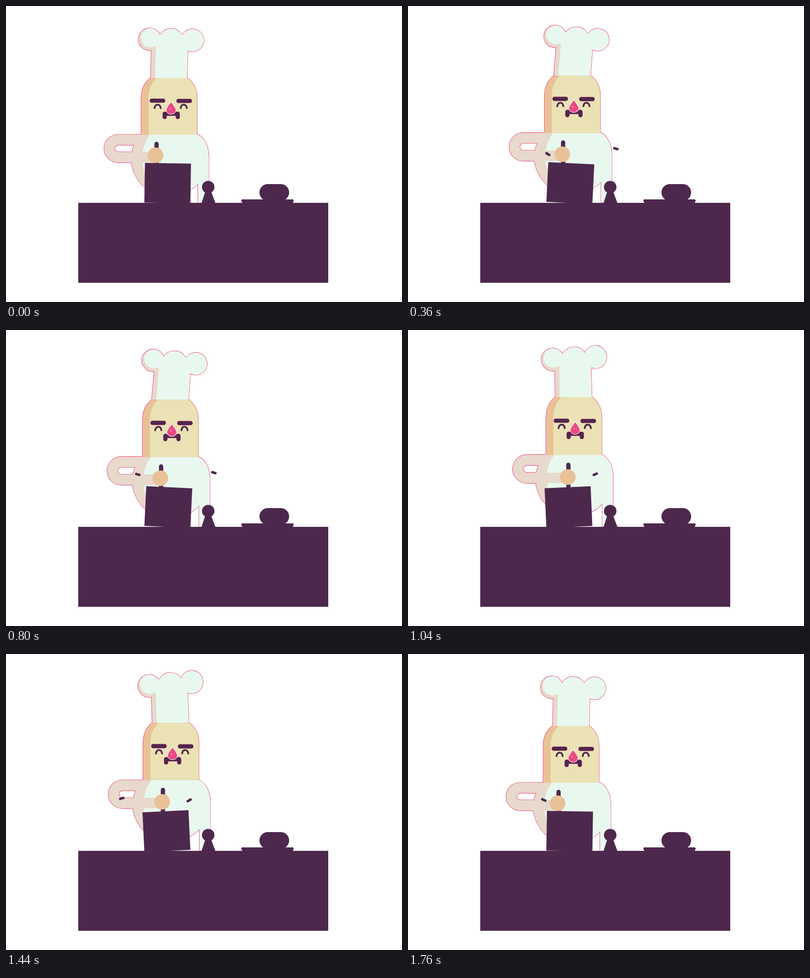
Animation of 800 by 600 pixels, one loop 1800 ms. Source, as an HTML page with a canvas:

```html
<!DOCTYPE html>
<html>
<head>
<meta charset="utf-8">
<title>Stirring chef</title>
<style>
html, body { margin: 0; width: 100%; height: 100%; overflow: hidden; background: #fff; }
canvas { display: block; }
</style>
</head>
<body>
<canvas id="stage" width="800" height="600"></canvas>
<script>
const ctx = document.getElementById('stage').getContext('2d');
const DARK = '#4d284d', PINK = '#ee4683', MINT = '#e8f8ef', TAN = '#e7d9cb',
      CREAM = '#eae2b5', PEACH = '#e9c197';
const STEP = 40, FRAMES = 45, CYCLE = 11;
const LEFT_STARTS = [7, 16, 28, 41], RIGHT_STARTS = [1, 12, 23, 34], CRUMB_LIFE = 9;

const move = (x, y) => new DOMMatrix().translate(x, y);

function place(d, matrix) {
  const path = new Path2D();
  path.addPath(new Path2D(d), matrix);
  return path;
}

const circle = (x, y, r) => `M${x - r} ${y}a${r} ${r} 0 1 1 ${2 * r} 0a${r} ${r} 0 1 1 ${-2 * r} 0Z`;

function fill(path, color) {
  ctx.fillStyle = color;
  ctx.fill(path);
}

function line(path, width, color) {
  ctx.lineWidth = width;
  ctx.strokeStyle = color;
  ctx.stroke(path);
}

const TORSO = 'M273 260H386C402 267 409.5 286 409.5 305V425H388V360A84 84 0 0 1 331 385' +
              'C290 390 253 350 253 310Q254 281 273 260Z';
const TORSO_LIGHT = 'M292 260H386C402 267 409.5 286 409.5 305V425H388V360A84 84 0 0 1 331 385' +
                    'C300 385 275 345 275 307Q276 278 292 260Z';
const STEM = 'M292 148L294 80V65H367V80L366 148Z';
const STEM_LIGHT = 'M301 148L303 80V58H367V80L366 148Z';
const BIG_PUFFS = circle(333.5, 72, 26) + circle(376.8, 69.5, 22.7);

const head = (top, left, ctrl, mid) =>
  `M${left} ${top}C${ctrl} ${top + 9} ${mid} ${top + 22} ${mid} 186V261H385.7V185` +
  `C385.7 168 378 ${top + 8} 366 ${top}Z`;

function drawFace(at) {
  const brows = place('M294.5 192H317.5M348.5 192.5H371.5', at);
  const moustache = place('M320.5 225V218.5H347V225', at);
  const eyes = place('M300 207Q301 200 306.3 200T312.5 207M353 207Q353.5 200 358.9 200T365.3 207', at);
  const nose = place('M333.5 195Q343 207 343 211A9.5 8 0 0 1 324 211Q324 207 333.5 195Z', at);
  for (const part of [brows, moustache]) {
    line(part, 8.8, PINK);
    line(part, 7.8, DARK);
  }
  line(eyes, 3.6, DARK);
  line(nose, 2, '#fff');
  fill(nose, '#ec4a84');
  fill(place(circle(331.5, 208, 1), at), '#fff');
}

function drawCrumbs(frame, starts, x, y, speed) {
  for (const start of starts) {
    const age = frame - start;
    if (age < 0 || age >= CRUMB_LIFE) continue;
    ctx.save();
    ctx.translate(x + speed * age, y - 7.4 * age + 0.615 * age * age);
    ctx.rotate(Math.atan((-7.4 + 1.23 * age) / speed));
    line(new Path2D('M-3.3 0H3.3'), 5, DARK);
    ctx.restore();
  }
}

function drawProps(wobble) {
  const pot = move(326, 399.2).rotate(0.9 - wobble);
  fill(place('M-46.5 -80.5H46.5V0H-46.5Z', pot), DARK);
  fill(new Path2D('M146 399H651V561H146Z'), DARK);
  fill(new Path2D(circle(408.5, 367, 12.6) + 'M403 375H414L423 399H395Z'), DARK);
  fill(new Path2D('M529 361H555A17 17 0 0 1 555 395H529A17 17 0 0 1 529 361Z'), DARK);
  fill(new Path2D('M477 392H579Q581.5 392 581 395L579 400H478L475.5 395Q475 392 477 392Z'), DARK);
}

function draw(frame) {
  const turn = 2 * Math.PI / CYCLE, phase = frame % CYCLE;
  const lift = (1 - Math.cos(turn * (phase - 0.25))) / 2;
  const sway = Math.sin(turn * phase);

  const torsoAt = move(6 * lift, -10 * lift);
  const headAt = move(7.5 * lift, -10 * lift);
  const faceAt = move(5 * lift + 0.4 * sway, -10.5 * lift);
  const hatAt = move(329.5 + 7 * lift, 146 - 13.5 * lift)
    .rotate(-3.5 * sway).scale(1, 1 + 0.013 * sway).translate(-329.5, -146);
  // The puffs whip further when the hat leans left
  const puffsAt = hatAt.translate(333, 71).rotate(-1.5 * sway * (1 + sway)).translate(-333, -71);

  const crown = 146 - 3 * lift;
  const handX = 302 + 27 * lift, handY = 302.7 - 6 * lift;
  const elbow = 226.5 + 18 * lift, armY = 271.2 - 10 * lift, foreY = 306.7 - 9 * lift;
  const bend = (foreY - armY) / 2;
  const arm = new Path2D(`M${277 + 6 * lift} ${armY}H${elbow}A${bend} ${bend} 0 0 0 ${elbow} ${foreY}H${handX}`);

  const torso = place(TORSO, torsoAt);
  const stem = place(STEM, hatAt);
  const puffs = place(circle(290.5, 67.7, 22.7) + BIG_PUFFS, puffsAt);
  const skull = place(head(crown, 292, 280, 273.3), headAt);

  ctx.fillStyle = '#fff';
  ctx.fillRect(0, 0, 800, 600);

  // Thin pink rim around the whole silhouette
  ctx.lineCap = 'butt';
  for (const part of [torso, stem, puffs, skull]) line(part, 1.8, PINK);
  line(arm, 23, PINK);

  fill(torso, TAN);
  fill(place(TORSO_LIGHT, torsoAt), MINT);
  line(arm, 21.2, TAN);

  fill(stem, TAN);
  fill(puffs, TAN);
  fill(place(STEM_LIGHT, hatAt), MINT);
  fill(place(circle(291.7, 64.5, 19.4) + BIG_PUFFS, puffsAt), MINT);

  fill(skull, PEACH);
  fill(place(head(crown, 305, 294, 288), headAt), CREAM);

  ctx.lineCap = ctx.lineJoin = 'round';
  drawFace(faceAt);
  drawCrumbs(frame, LEFT_STARTS, 298.7, 312.5, -8.1);
  drawCrumbs(frame, RIGHT_STARTS, 353.3, 309, 8.33);

  const spoonX = 304 + 26 * lift;
  line(new Path2D(`M${spoonX} ${279.5 - 8 * lift}V325`), 8.6, DARK);
  fill(new Path2D(circle(handX, handY, 15.8)), PEACH);

  drawProps(2.75 * Math.sin(turn * (phase - 0.55)) + 0.9);
}

function tick() {
  draw(Math.floor(performance.now() / STEP) % FRAMES);
  requestAnimationFrame(tick);
}
tick();
</script>
</body>
</html>
```
